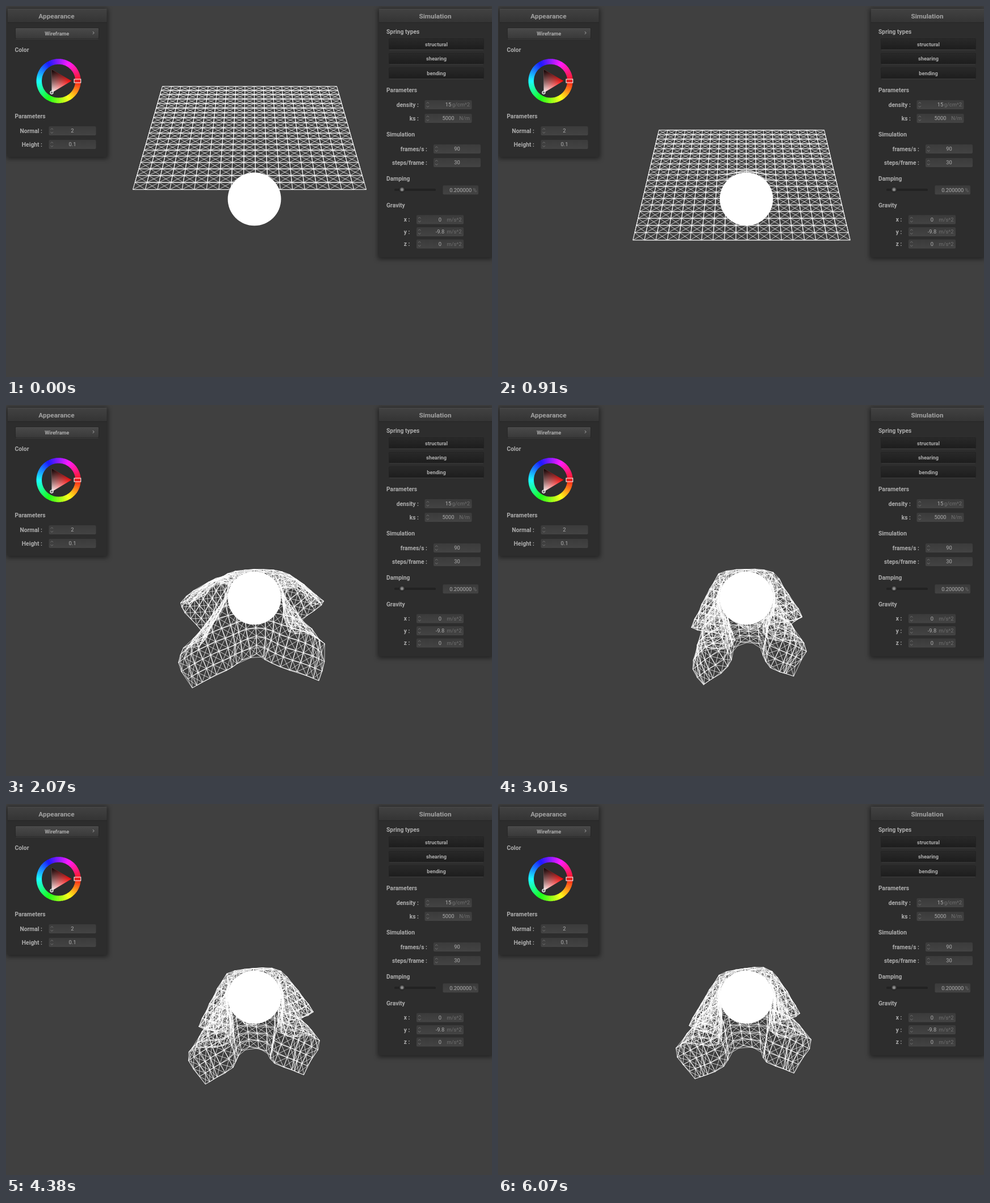
An HTML page for the animation above (6.11 s loop, 856x654 px).

```html
<!DOCTYPE html>
<html lang="en">
<head>
<meta charset="utf-8">
<title>Cloth simulation</title>
<style>
  html, body { margin: 0; width: 100%; height: 100%; overflow: hidden; background: #404040; }
  svg { display: block; width: 100vw; height: 100vh; font-family: Roboto, "Open Sans", sans-serif; }
</style>
</head>
<body>
<svg id="stage" viewBox="0 0 856 654">
  <defs>
    <linearGradient id="header" x2="0" y2="1"><stop stop-color="#424242"/><stop offset="1" stop-color="#343434"/></linearGradient>
    <linearGradient id="raised" x2="0" y2="1"><stop stop-color="#4a4a4a"/><stop offset="1" stop-color="#393939"/></linearGradient>
    <linearGradient id="pushed" x2="0" y2="1"><stop stop-color="#292929"/><stop offset="1" stop-color="#1d1d1d"/></linearGradient>
    <linearGradient id="field" x2="0" y2="1"><stop stop-color="#3b3b3b"/><stop offset="1" stop-color="#434343"/></linearGradient>
    <linearGradient id="knob" x2="0" y2="1"><stop stop-color="#555"/><stop offset="1" stop-color="#333"/></linearGradient>
    <linearGradient id="tint" gradientUnits="userSpaceOnUse" x1="115.5" y1="132" x2="80.5" y2="153"><stop stop-color="#f00"/><stop offset="1" stop-color="#fff"/></linearGradient>
    <linearGradient id="shade" gradientUnits="userSpaceOnUse" x1="98" y1="142.5" x2="80.5" y2="112"><stop stop-opacity="0"/><stop offset="1"/></linearGradient>
    <filter id="blur" x="-20%" y="-20%" width="140%" height="140%"><feGaussianBlur stdDeviation="4"/></filter>
  </defs>
  <rect width="856" height="654" fill="#404040"/>
  <path id="cloth" fill="none" stroke="#fff" stroke-width=".72"/>
  <circle cx="437.5" cy="340.3" r="46.9" fill="#fff"/>
  <g id="panels"></g>
</svg>
<script>
const panels = document.getElementById('panels');

function add(tag, attrs, content = '') {
  const node = document.createElementNS('http://www.w3.org/2000/svg', tag);
  for (const key in attrs) node.setAttribute(key, attrs[key]);
  node.textContent = content;
  panels.appendChild(node);
}

function text(str, x, middle, size, { fill = '#adadad', weight = 700, anchor = 'start' } = {}) {
  add('text', { x, y: middle + size * 0.355, 'font-size': size, fill, 'font-weight': weight, 'text-anchor': anchor }, str);
}

function panel(title, x, width, height, center) {
  add('rect', { x: x - 2, y: 5, width: width + 4, height: height + 3, fill: '#000', opacity: 0.5, filter: 'url(#blur)' });
  add('rect', { x, y: 5, width, height, rx: 1.5, fill: '#2d2d2d' });
  add('rect', { x, y: 5, width, height: 24, rx: 1.5, fill: 'url(#header)' });
  add('path', { d: `M${x} 5.5h${width}`, stroke: '#4c4c4c', 'stroke-width': 0.8 });
  add('path', { d: `M${x} 29.3h${width}`, stroke: '#222', 'stroke-width': 0.9 });
  text(title, center, 17.6, 11.8, { fill: '#a2a2a2', anchor: 'middle' });
}

function button(label, x, y, width, center, fill) {
  add('rect', { x, y, width, height: 19, rx: 1.5, fill: `url(#${fill})`, stroke: '#222', 'stroke-width': 0.8 });
  add('path', { d: `M${x + 1} ${y + 19.8}h${width - 2}`, stroke: '#4a4a4a', 'stroke-width': 0.7 });
  text(label, center, y + 10, 9.2, { anchor: 'middle' });
}

const heading = (str, x, y) => text(str, x, y, 10.35);

function box(x, y, width, value, unit, unitX) {
  add('rect', { x, y: y - 8, width, height: 16, rx: 2, fill: 'url(#field)' });
  text(value, x + width / 2, y, 9.35, { weight: 400, anchor: 'middle', fill: '#b0b0b0' });
  if (unit) text(unit, unitX, y, 9.35, { weight: 400, anchor: 'end', fill: '#707070' });
}

function spinner(label, labelX, x, y, value, unit) {
  text(label + ' :', labelX, y, 10.3, { anchor: 'end' });
  box(x, y, 83, value, unit, x + 79.5);
  add('path', {
    d: `M${x + 3} ${y - 2.2}l2.3 -2 2.3 2M${x + 3} ${y + 2.2}l2.3 2 2.3 -2`,
    fill: 'none', stroke: '#7c7c7c', 'stroke-width': 0.8
  });
}

function colorWheel(cx, cy, radius) {
  const at = deg => {
    const a = deg * Math.PI / 180;
    return `${cx + radius * Math.cos(a)} ${cy + radius * Math.sin(a)}`;
  };
  for (let hue = 0; hue < 360; hue += 5) {
    add('path', {
      d: `M${at(hue - 0.5)}A${radius} ${radius} 0 0 1 ${at(hue + 5.5)}`,
      fill: 'none', stroke: `hsl(${hue + 2.5} 100% 55%)`, 'stroke-width': 9.5
    });
  }
  for (const paint of ['tint', 'shade']) add('path', { d: 'M115.5 132L80.5 153V112Z', fill: `url(#${paint})` });
  add('circle', { cx: 80.5, cy: 152.6, r: 2.6, fill: '#777', stroke: '#fff', 'stroke-width': 1.1 });
  add('rect', { x: 120, y: 129, width: 11.8, height: 6.2, fill: '#e32222', stroke: '#fff', 'stroke-width': 1 });
}

function buildPanels() {
  panel('Appearance', 3, 174.5, 261, 89);
  button('Wireframe', 16.5, 38.5, 147, 89.7, 'raised');
  add('path', { d: 'M153 45.2l2 2.2 -2 2.2', fill: 'none', stroke: '#b5b5b5', 'stroke-width': 1 });
  heading('Color', 15.5, 77.8);
  colorWheel(92.6, 132.2, 34.3);
  heading('Parameters', 15.5, 194.6);
  spinner('Normal', 64, 75.5, 220, '2');
  spinner('Height', 64, 75.5, 244, '0.1');

  panel('Simulation', 657, 199, 438, 756);
  heading('Spring types', 670, 45.3);
  ['structural', 'shearing', 'bending'].forEach((name, i) => button(name, 674.5, 57.5 + i * 25.7, 167, 758, 'pushed'));
  heading('Parameters', 670, 148);
  spinner('density', 727, 737.5, 174, '15', 'g/cm^2');
  spinner('ks', 727, 737.5, 198, '5000', 'N/m');
  heading('Simulation', 670, 226);
  spinner('frames/s', 742, 753, 252, '90');
  spinner('steps/frame', 742, 753, 276, '30');
  heading('Damping', 670, 304.2);
  add('rect', { x: 684, y: 322, width: 73, height: 4, rx: 1.5, fill: '#222' });
  add('circle', { cx: 697.5, cy: 323.8, r: 4.8, fill: 'url(#knob)', stroke: '#1c1c1c', 'stroke-width': 0.8 });
  add('circle', { cx: 697.5, cy: 323.8, r: 2.5, fill: '#8c8c8c' });
  box(769.5, 324.2, 62.5, '0.200000', '%', 829);
  heading('Gravity', 670, 351);
  ['x', 'y', 'z'].forEach((axis, i) => spinner(axis, 711.5, 723, 376.6 + i * 21.4, axis === 'y' ? '-9.8' : '0', 'm/s^2'));
}

// Mass-spring cloth dropped on a sphere.
const N = 20, SPACING = 1 / N, STEPS = 30, DT = 1 / 90 / STEPS;
const MASS = 15 / (N * N), KS = 5000, BEND = KS * 0.02, GRAVITY = -9.8, KEEP = 1 - 0.2 / 100;
const CENTER = 0.5, RADIUS = 0.15, FRICTION = 0.3;
const WARMUP = 460, FRAMES = 120;

const pos = new Float64Array(N * N * 3);
for (let i = 0; i < N * N; i++) pos.set([(i % N) * SPACING, 1, Math.floor(i / N) * SPACING], i * 3);
const last = pos.slice(), acc = new Float64Array(pos.length);

const springs = [];
function link(col, row, dc, dr, stiffness) {
  const c = col + dc, r = row + dr;
  if (c < 0 || c >= N || r < 0) return;
  springs.push({ a: (row * N + col) * 3, b: (r * N + c) * 3, rest: Math.hypot(dc, dr) * SPACING, stiffness });
}
for (let row = 0; row < N; row++) {
  for (let col = 0; col < N; col++) {
    link(col, row, -1, 0, KS);
    link(col, row, 0, -1, KS);
    link(col, row, -1, -1, KS);
    link(col, row, 1, -1, KS);
    link(col, row, -2, 0, BEND);
    link(col, row, 0, -2, BEND);
  }
}

function pull(target, { a, b }, x, y, z, k) {
  target[a] += x * k; target[a + 1] += y * k; target[a + 2] += z * k;
  target[b] -= x * k; target[b + 1] -= y * k; target[b + 2] -= z * k;
}

function eachSpring(visit) {
  for (const s of springs) {
    const x = pos[s.b] - pos[s.a], y = pos[s.b + 1] - pos[s.a + 1], z = pos[s.b + 2] - pos[s.a + 2];
    visit(s, x, y, z, Math.sqrt(x * x + y * y + z * z));
  }
}

function collide(i) {
  const x = pos[i] - CENTER, y = pos[i + 1] - CENTER, z = pos[i + 2] - CENTER;
  const dist = Math.sqrt(x * x + y * y + z * z);
  if (dist > RADIUS) return;
  const k = RADIUS / dist;
  [x, y, z].forEach((v, axis) => {
    const from = last[i + axis];
    pos[i + axis] = from + (CENTER + v * k - from) * (1 - FRICTION);
  });
}

function step() {
  for (let i = 0; i < acc.length; i++) acc[i] = i % 3 === 1 ? GRAVITY : 0;
  eachSpring((s, x, y, z, len) => {
    if (len > 0) pull(acc, s, x, y, z, s.stiffness * (len - s.rest) / len / MASS);
  });
  for (let i = 0; i < pos.length; i++) {
    const next = pos[i] + KEEP * (pos[i] - last[i]) + acc[i] * DT * DT;
    last[i] = pos[i];
    pos[i] = next;
  }
  for (let i = 0; i < pos.length; i += 3) collide(i);
  eachSpring((s, x, y, z, len) => {
    const limit = s.rest * 1.1;
    if (len > limit) pull(pos, s, x, y, z, (len - limit) / len / 2);
  });
}

const VIEW = { x: 429, y: 335.3, focal: 969, distance: 2.856, sin: 0.6026, cos: 0.798 };

function project() {
  const out = [];
  for (let i = 0; i < pos.length; i += 3) {
    const x = pos[i] - 0.475, y = pos[i + 1] - 0.5, z = pos[i + 2] - 0.475;
    const scale = VIEW.focal / (VIEW.distance - y * VIEW.sin - z * VIEW.cos);
    out.push((VIEW.x + x * scale).toFixed(1) + ' ' + (VIEW.y - (y * VIEW.cos - z * VIEW.sin) * scale).toFixed(1));
  }
  return out;
}

function simulate() {
  for (let i = 0; i < WARMUP; i++) step();
  const poses = [project()];
  while (poses.length <= FRAMES) {
    for (let i = 0; i < STEPS; i++) step();
    poses.push(project());
  }
  return poses;
}

// Bursts of evenly spaced picture changes: first ms, last ms, count.
const LOOP = 6110;
const BURSTS = [
  [20, 620, 13], [660, 1270, 13], [1320, 1370, 2], [1410, 1920, 11], [1980, 2070, 3], [2140, 2570, 9],
  [2640, 3010, 9], [3060, 3210, 4], [3260, 3850, 12], [3890, 4380, 10], [4420, 4470, 2],
  [4520, 5100, 12], [5160, 5740, 13], [5790, 6070, 7]
];

function poseAt(ms) {
  let index = 0;
  for (const [from, to, count] of BURSTS) {
    if (ms < from) break;
    index += Math.min(count, 1 + Math.floor((ms - from) / (to - from) * (count - 1) + 1e-6));
  }
  return index;
}

buildPanels();
const poses = simulate();
const cloth = document.getElementById('cloth');
let shown = -1;

function draw(ms) {
  const index = poseAt(ms);
  if (index === shown) return;
  shown = index;
  const points = poses[index];
  cloth.setAttribute('d', springs.map(s => `M${points[s.a / 3]}L${points[s.b / 3]}`).join(''));
}

draw(0);
const start = performance.now();
(function tick() {
  draw((performance.now() - start) % LOOP);
  requestAnimationFrame(tick);
})();
</script>
</body>
</html>
```
